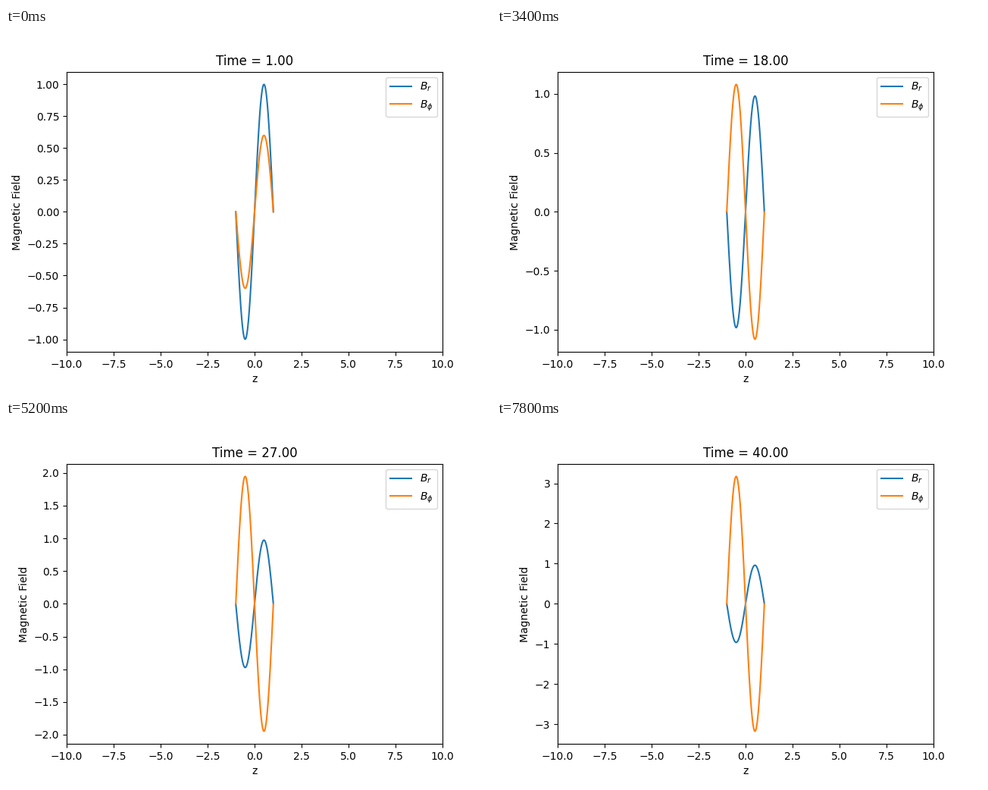
A matplotlib script that plays this animation: 640 by 480 pixels, repeating every 8000 ms.

```python
import numpy as np
import matplotlib.pyplot as plt
from matplotlib.animation import FuncAnimation

FRAMES = 40
DECAY = 1e-4 * np.pi ** 2   # resistive decay rate of the sine mode
SHEAR = 0.1                 # rate at which shear turns B_r into B_phi
PHI_START = 0.7

z = np.linspace(-1, 1, 200)
mode = np.sin(np.pi * z)

fig, ax = plt.subplots(figsize=(6.4, 4.8), dpi=100)
line_r, = ax.plot(z, mode, label=r"$B_r$")
line_phi, = ax.plot(z, mode, label=r"$B_\phi$")
ax.set_xlim(-10, 10)
ax.set_xlabel("z")
ax.set_ylabel("Magnetic Field")
ax.legend(loc="upper right")
title = ax.set_title("")


def update(frame):
    t = frame + 1
    damping = np.exp(-DECAY * t)
    line_r.set_ydata(damping * mode)
    line_phi.set_ydata(damping * (PHI_START - SHEAR * t) * mode)
    ax.relim()
    ax.autoscale_view(scalex=False)
    title.set_text(f"Time = {t:.2f}")
    return line_r, line_phi, title


anim = FuncAnimation(fig, update, frames=FRAMES, interval=200,
                     init_func=lambda: update(0), repeat=True, repeat_delay=0)
plt.show()
```
